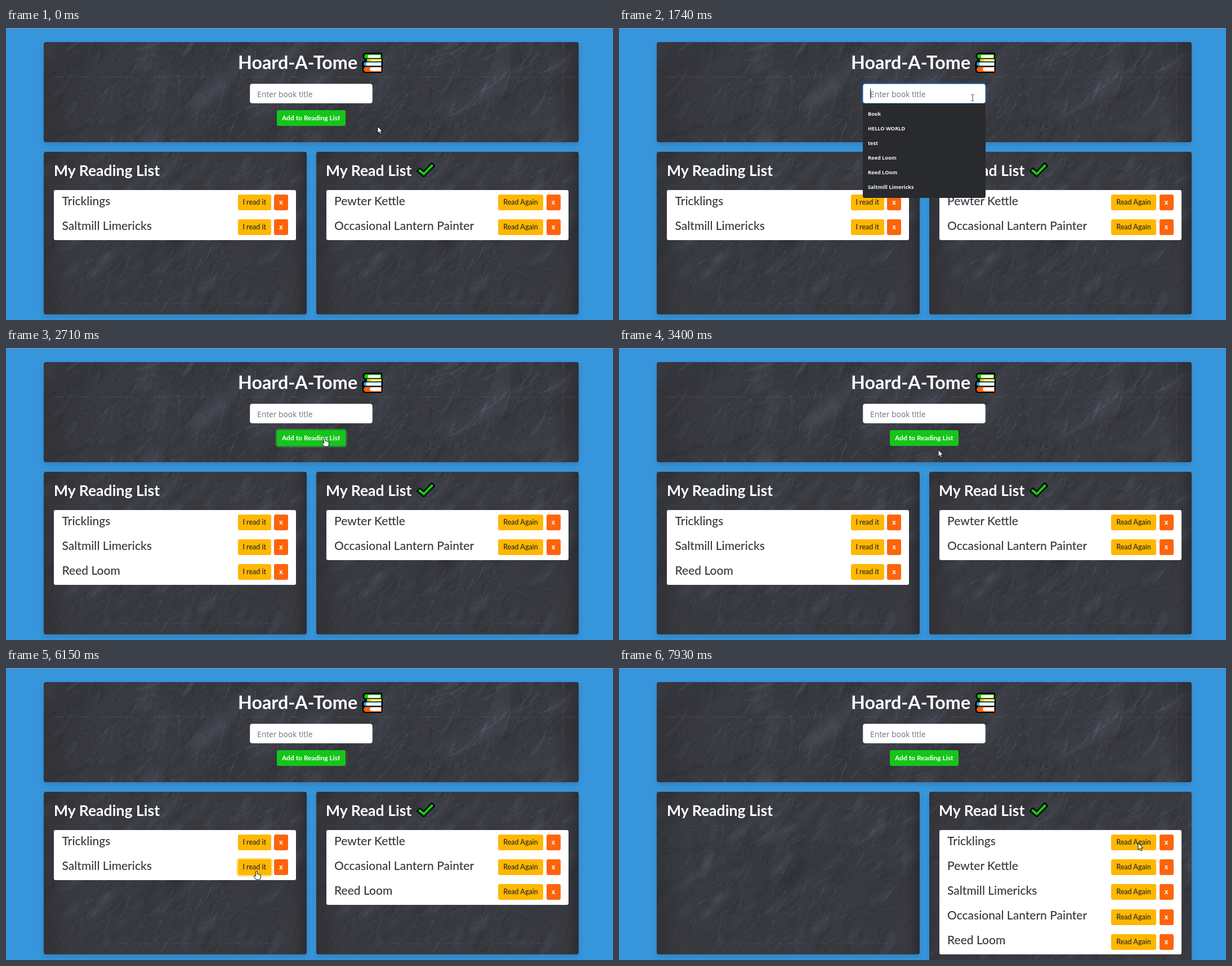
These frames come from a looping animation (1078x519 px, 8000 ms). An HTML page with a canvas:

```html
<!DOCTYPE html>
<html lang="en">
<head>
<meta charset="utf-8">
<title>Reading list</title>
<style>
  html, body { margin: 0; width: 100%; height: 100%; overflow: hidden; background: #3795db; }
  #stage { position: relative; width: 1078px; height: 519px; overflow: hidden; font-family: Lato, sans-serif; }
  #stage * { position: absolute; box-sizing: border-box; white-space: pre; }
  #edge { left: 0; top: 0; width: 1078px; height: 1px; background: #7d9bb5; }
  canvas { border-radius: 4px; object-fit: cover; box-shadow: 0 5px 10px rgba(0, 0, 0, .13); }
  h1, h2 { margin: 0; color: #fff; font-weight: 700; line-height: 40px; }
  h1 { left: 412px; top: 41px; font-size: 32.3px; }
  h2 { top: 233px; font-size: 26.6px; }
  .btn { height: 28px; border-radius: 3px; font-size: 12.5px; font-weight: 500; line-height: 27px; text-align: center; color: #212529; background: #ffb700; }
  .btn.ring { box-shadow: 0 0 0 2.5px rgba(255, 193, 7, .5); }
  .del { width: 25px; color: #fff; background: #fd640c; font-weight: 700; }
  #add { left: 481px; top: 145.5px; width: 121.5px; font-size: 12px; font-weight: 700; color: #fff; background: #15c519; }
  #add.ring { box-shadow: 0 0 0 2.5px rgba(40, 190, 69, .5); }
  #field { left: 433px; top: 99px; width: 217.5px; height: 35px; border-radius: 4px; background: #fff; border: 1px solid #ced4da;
    font: 13.8px/36px "Open Sans", sans-serif; color: #495057; }
  #field.focus { border-color: #80bdff; box-shadow: 0 0 0 2.5px rgba(0, 110, 255, .25); }
  #value { left: 12px; top: 0; }
  #value.empty { color: #6c757d; }
  #caret { top: 8px; width: 1px; height: 18px; background: #222; }
  #menu { left: 433px; top: 134px; width: 217.5px; background: #292a2d; border-radius: 0 0 3px 3px;
    font: 700 9.2px/26px "Open Sans", sans-serif; color: #f1f1f1; }
  #menu div { left: 9px; }
  .list { top: 288px; width: 430px; background: #fff; border-radius: 3px; }
  .name { left: 14.5px; font-size: 21px; font-weight: 500; line-height: 30px; color: #37383d; }
  svg { left: 0; top: 0; overflow: visible; }
  #cursor { width: 1px; height: 1px; }
</style>
</head>
<body>
<div id="stage">
  <div id="edge"></div>
  <canvas id="top" width="950" height="178" style="left:67px;top:25px"></canvas>
  <canvas id="left" width="467" height="289" style="left:67px;top:220px"></canvas>
  <canvas id="right" width="467" height="289" style="left:550.500px;top:220px;width:466.500px"></canvas>
  <h1>Hoard-A-Tome</h1>
  <h2 style="left:85px">My Reading List</h2>
  <h2 style="left:568px">My Read List</h2>
  <svg width="1078" height="519">
    <path d="M638 44H667Q669 45 668 47L667 53L669 56V68L668 79Q667 80 665 80H637Q632 78 633 70Q631 66 633 60L638 57L634 53Q632 46 638 44Z"/>
    <path fill="#15c50f" d="M638 46.500H666V54H638Q634 50 638 46.500Z"/>
    <path fill="#ffc80a" d="M642 55H667V59.500H642Q639 57 642 55Z"/>
    <path fill="#2a9be8" d="M637 60.500H667V67.500H637Q633 64 637 60.500Z"/>
    <path fill="#fb5e0b" d="M638 69H667V78H638Q632 73.500 638 69Z"/>
    <path fill="#fff" d="M665 48H644Q641 50.500 644 53H665ZM666 56.500H648V58.500H666ZM666 61.500H641Q638 64 641 66.800H666ZM666 70H648Q644 73 648 76.500H666Z"/>
    <path fill="#15c80f" stroke="#000" stroke-width="2.4" stroke-linejoin="round" d="M730 254L735 249L742 255L756 240L761 245L742 264Z"/>
  </svg>
  <div id="field"><span id="value"></span><span id="caret"></span></div>
  <div id="add" class="btn">Add to Reading List</div>
  <div id="toRead"></div>
  <div id="done"></div>
  <div id="menu"></div>
  <svg id="cursor">
    <path id="arrow" fill="#fff" stroke="#000" stroke-width=".9" d="M0 0V12L2.800 9.500L4.800 14L6.800 13L4.900 8.800H8.600Z"/>
    <path id="hand" fill="#fff" stroke="#000" stroke-width=".9" stroke-linejoin="round" d="M-1.500 .8Q0-1 1.300 .8V5.500Q2.500 4.600 3.700 5.900Q5 5.200 6 6.600Q7.500 6.300 7.500 8V11L6 15H-1L-4.700 9.500Q-5 7.400-3 8L-1.500 9.500Z"/>
    <path id="beam" fill="none" stroke="#444" d="M-2.500-5.500H-.7L0-5L.7-5.500H2.500M0-5V5M-2.500 5.500H-.7L0 5L.7 5.500H2.500"/>
  </svg>
</div>
<script>
const $ = id => document.getElementById(id);
const LOOP = 8000;
const books = ['Tricklings', 'Pewter Kettle', 'Saltmill Limericks', 'Occasional Lantern Painter', 'Reed Loom'];
const history = ['Book', 'HELLO WORLD', 'test', 'Reed Loom', 'Reed LOom', 'Saltmill Limericks'];
const matches = ['Reed Loom', 'Reed LOom', 'reed loom'];

// Each entry changes part of the page state from its time on.
const events = [
  [0, { text: '', focus: false, menu: [], add: false, toRead: [0, 2], done: [1, 3], ring: -1 }],
  [1610, { focus: true, menu: history }],
  [1880, { text: 'Re', menu: matches }],
  [2010, { text: 'Reed L' }],
  [2140, { text: 'Reed Loom' }],
  [2440, { menu: [] }],
  [2590, { focus: false, add: true }],
  [2710, { text: '', toRead: [0, 2, 4] }],
  [2990, { add: false }],
  [4490, { ring: 4 }],
  [4880, { ring: -1, toRead: [0, 2], done: [1, 3, 4] }],
  [6020, { ring: 2 }],
  [6290, { ring: -1, toRead: [0], done: [1, 2, 3, 4] }],
  [7070, { ring: 0 }],
  [7350, { ring: -1, toRead: [], done: [0, 1, 2, 3, 4] }]
];

// Pointer moves: first step, last step, step count, end point, shape on arrival.
const moves = [
  [0, 0, 1, 660, 175, 'arrow'],
  [140, 140, 1, 652, 172, 'arrow'],
  [420, 720, 3, 677, 184, 'arrow'],
  [870, 1460, 5, 624, 124, 'beam'],
  [1610, 1740, 2, 628, 124, 'beam'],
  [1880, 2140, 3, 755, 158, 'arrow'],
  [2290, 2290, 1, 764, 151, 'arrow'],
  [2440, 2590, 2, 566, 160, 'hand'],
  [3400, 3400, 1, 567, 181, 'arrow'],
  [3520, 4340, 7, 445, 398, 'hand'],
  [4490, 4490, 1, 444, 398, 'arrow'],
  [5300, 5570, 3, 445, 361, 'hand'],
  [6420, 6950, 5, 445, 312, 'hand'],
  [7070, 7070, 1, 445, 311, 'arrow'],
  [7490, 7640, 2, 922, 312, 'hand'],
  [7930, 7930, 1, 922, 311, 'arrow']
];

// Centres of the chalky areas on the slate.
const smudges = [[182, 85], [250, 65], [395, 120], [425, 45], [205, 220], [76, 190], [325, 245], [60, 40]];

function rng(seed) {
  return () => (seed = (seed * 16807) % 2147483647) / 2147483647;
}

// Slate with chalk smudges, scratches and dust, laid out on a 466 unit wide sheet.
function drawBoard(id, scale, dy) {
  const canvas = $(id), g = canvas.getContext('2d'), rand = rng(41);
  const spread = size => (rand() + rand() + rand() - 1.5) * size;
  const streaks = (count, length, width, alpha) => {
    for (let i = 0; i < count; i++) {
      const light = rand() < .6;
      const [cx, cy] = smudges[Math.floor(rand() * smudges.length)];
      const x = light ? cx + spread(110) : 466 * rand();
      const y = light ? cy + spread(90) : 300 * rand();
      const angle = -.9 + spread(.6), len = length * (.3 + rand());
      const dx = Math.cos(angle) * len, rise = Math.sin(angle) * len;
      g.strokeStyle = `rgba(${light ? '118,124,146' : '26,26,30'},${alpha * (.3 + rand())})`;
      g.lineWidth = width * (.4 + rand());
      g.beginPath();
      g.moveTo(x, y);
      g.quadraticCurveTo(x + dx * .6, y + rise * .3, x + dx, y + rise);
      g.stroke();
    }
  };
  g.fillStyle = '#393a40';
  g.fillRect(0, 0, canvas.width, canvas.height);
  g.scale(scale, scale);
  g.translate(0, dy);
  g.lineCap = 'round';
  g.filter = `blur(${4 * scale}px)`;
  streaks(130, 40, 12, .13);
  g.filter = `blur(${.6 * scale}px)`;
  streaks(700, 24, 1.8, .13);
  g.filter = 'none';
  streaks(1300, 10, .6, .2);
  for (let i = 0; i < 9000; i++) {
    g.fillStyle = rand() < .5 ? 'rgba(130,136,156,.15)' : 'rgba(20,20,24,.2)';
    g.fillRect(466 * rand(), 300 * rand(), 1.6 * rand(), 1);
  }
  g.fillStyle = 'rgba(130,138,165,.09)';
  for (let i = 0; i < 140; i++) {
    g.fillRect(466 * rand(), 60, 8 * rand(), .7);
    g.fillRect(452, 300 * rand(), .7, 8 * rand());
    g.fillRect(110 + 330 * rand(), 269, 8 * rand(), .7);
  }
  const shade = g.createLinearGradient(0, 0, 466, 0);
  shade.addColorStop(0, 'rgba(38,38,42,.35)');
  shade.addColorStop(.1, 'rgba(38,38,42,0)');
  shade.addColorStop(.95, 'rgba(38,38,42,0)');
  shade.addColorStop(1, 'rgba(38,38,42,.6)');
  g.fillStyle = shade;
  g.fillRect(0, 0, 467, 320);
}

function listHtml(ids, x, label, btnX, btnW, ring) {
  if (!ids.length) return '';
  const rows = ids.map((id, i) => {
    const y = 44.1 * i;
    return `<span class="name" style="top:${y + 4}px">${books[id]}</span>` +
      `<div class="btn${id === ring ? ' ring' : ''}" style="left:${btnX}px;top:${y + 8.2}px;width:${btnW}px">${label}</div>` +
      `<div class="btn del" style="left:391px;top:${y + 8.2}px">x</div>`;
  });
  return `<div class="list" style="left:${x}px;height:${44.1 * ids.length + .7}px">${rows.join('')}</div>`;
}

function showPage(s) {
  $('field').className = s.focus ? 'focus' : '';
  $('value').textContent = s.text || 'Enter book title';
  $('value').className = s.text ? '' : 'empty';
  $('caret').style.display = s.focus ? '' : 'none';
  $('caret').style.left = 12 + (s.text ? $('value').offsetWidth : 0) + 'px';
  $('add').classList.toggle('ring', s.add);
  $('menu').style.display = s.menu.length ? '' : 'none';
  $('menu').style.height = 12 + 26 * s.menu.length + 'px';
  $('menu').innerHTML = s.menu.map((item, i) => `<div style="top:${6 + 26 * i}px">${item}</div>`).join('');
  $('toRead').innerHTML = listHtml(s.toRead, 85, 'I read it', 327, 58.5, s.ring);
  $('done').innerHTML = listHtml(s.done, 568.5, 'Read Again', 305.5, 80, s.ring);
  $('right').style.height = Math.max(289, 100 + 44.1 * s.done.length) + 'px';
}

function showPointer(t) {
  const i = moves.findLastIndex(m => m[0] <= t);
  const [start, end, count, x, y, shape] = moves[i];
  const [, , , fromX, fromY, fromShape] = moves[Math.max(0, i - 1)];
  const gap = count > 1 ? (end - start) / (count - 1) : 1;
  const step = Math.min(count, Math.floor((t - start) / gap + .01) + 1);
  const p = step / count;
  const kind = p === 1 ? shape : fromShape === 'beam' && shape === 'beam' ? 'beam' : 'arrow';
  $('cursor').style.transform = `translate(${Math.round(fromX + (x - fromX) * p)}px,${Math.round(fromY + (y - fromY) * p)}px)`;
  for (const id of ['arrow', 'hand', 'beam']) $(id).style.display = id === kind ? '' : 'none';
}

let shown = -1;
function tick() {
  const t = performance.now() % LOOP;
  const now = events.findLastIndex(e => e[0] <= t);
  if (now !== shown) {
    showPage(Object.assign({}, ...events.slice(0, now + 1).map(e => e[1])));
    shown = now;
  }
  showPointer(t);
  requestAnimationFrame(tick);
}

drawBoard('top', 2.04, -30);
drawBoard('left', 1, 0);
drawBoard('right', 1, 0);
tick();
</script>
</body>
</html>
```
